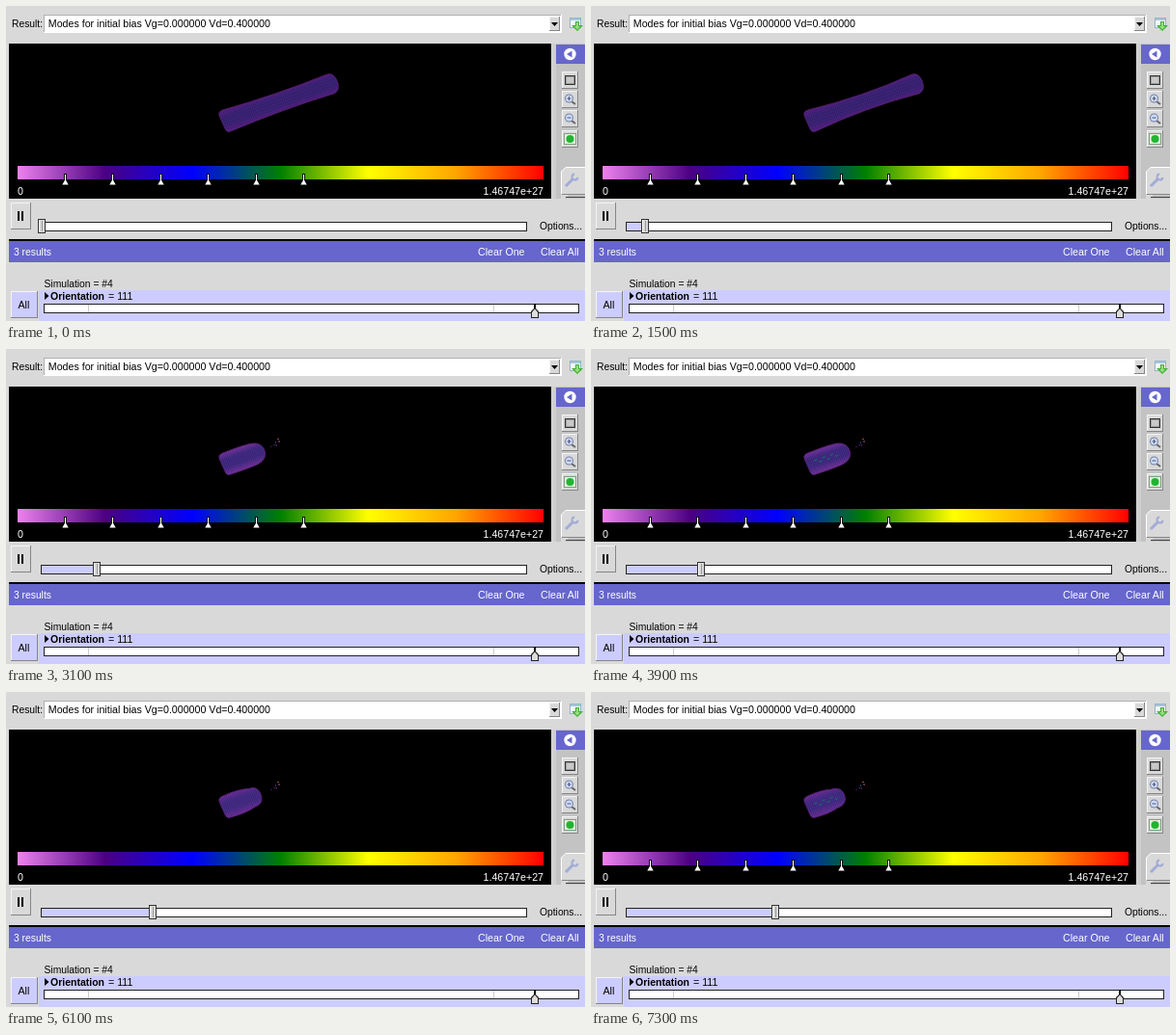
Animation of 600x327 px, one loop 8 s. Source, as an HTML page with a canvas:

```html
<!DOCTYPE html>
<html lang="en">
<head>
<meta charset="utf-8">
<title>Mode viewer</title>
<style>
  html, body { margin: 0; width: 100%; height: 100%; overflow: hidden; background: #d9d9d9; }
  canvas, svg { position: absolute; left: 0; top: 0; width: 600px; height: 327px; }
  text { font: 10.65px "Liberation Sans", Arial, sans-serif; white-space: pre; }
  .small { font-size: 10.3px; }
  .light { fill: #fff; }
  .bold { font-weight: bold; font-size: 10.5px; }
</style>
</head>
<body>
<canvas id="stage" width="600" height="327"></canvas>
<svg viewBox="0 0 600 327">
  <text class="small" x="6" y="22">Result:</text>
  <text x="43.8" y="22">Modes for initial bias Vg=0.000000 Vd=0.400000</text>
  <text class="light" x="12" y="196">0</text>
  <text class="light" x="557" y="196" text-anchor="end">1.46747e+27</text>
  <text class="small" x="553" y="232">Options...</text>
  <text class="light small" x="8" y="259">3 results</text>
  <text class="light" x="489" y="259">Clear One</text>
  <text class="light" x="554" y="259">Clear All</text>
  <text class="small" x="39.5" y="291.5">Simulation = #4</text>
  <text class="bold" x="46" y="305">Orientation</text>
  <text x="106" y="305">= 111</text>
  <text x="12.5" y="314">All</text>
</svg>
<script>
const LOOP = 8000, TICK = 100;
const FIRST_STEP = 760, STEP_TIME = 920, LAST_STEP = 8;
const GREY = '#d9d9d9', PANEL = '#c3c3c3', PURPLE = '#6666cc', LAVENDER = '#ccccff';
const c = document.getElementById('stage').getContext('2d');

function box(x, y, w, h, fill) {
  c.fillStyle = fill;
  c.fillRect(x, y, w, h);
}

function frame(x, y, w, h, fill, edge) {
  box(x, y, w, h, edge);
  box(x + 1, y + 1, w - 2, h - 2, fill);
}

function raised(x, y, w, h, fill) {
  box(x, y, w, h, '#858585');
  box(x, y, w - 1, h - 1, '#f4f4f4');
  box(x + 1, y + 1, w - 2, h - 2, fill);
}

function poly(points, fill) {
  c.beginPath();
  points.forEach(([x, y]) => c.lineTo(x, y));
  c.closePath();
  c.fillStyle = fill;
  c.fill();
}

function line(x1, y1, x2, y2, color, width = 1) {
  c.beginPath();
  c.moveTo(x1, y1);
  c.lineTo(x2, y2);
  c.strokeStyle = color;
  c.lineWidth = width;
  c.stroke();
}

function disc(x, y, r, fill) {
  c.beginPath();
  c.arc(x, y, r, 0, Math.PI * 2);
  c.fillStyle = fill;
  c.fill();
}

function drawResultBar() {
  box(39, 9, 537, 19, '#fff');
  box(39, 9, 536, 1, '#b0b0b0');
  box(39, 9, 1, 18, '#b0b0b0');
  raised(563, 11, 11, 15, GREY);
  poly([[565, 17], [572, 17], [568.5, 21]], '#000');

  frame(584, 12, 12, 11, '#f2f6f8', '#93b4c6');
  box(585, 13, 10, 2, '#a9c6da');
  poly([[590, 16], [594, 16], [594, 20], [598, 20], [592, 26], [586, 20], [590, 20]], '#43b035');
  poly([[591, 17], [593, 17], [593, 21], [595, 21], [592, 24.5], [589, 21], [591, 21]], '#96df7e');
}

function magnifier(y, plus) {
  line(586, y + 2, 590, y + 5, '#666', 2);
  disc(583.5, y - 1, 4.5, '#7380a6');
  disc(583.5, y - 1, 3.5, '#cfdaf6');
  line(581.5, y - 1, 585.5, y - 1, '#4b5680');
  if (plus) line(583.5, y - 3, 583.5, y + 1, '#4b5680');
}

function drawTools() {
  box(566, 39, 34, 161, PANEL);
  box(566, 39, 4, 161, '#cfcfcf');
  box(570, 40, 30, 20, PURPLE);
  disc(584.5, 50, 6.2, '#fff');
  poly([[581, 50], [586.5, 46.5], [586.5, 53.5]], PURPLE);

  [68, 88, 108, 129].forEach(y => raised(576, y, 17, 18, GREY));
  frame(579, 72, 11, 10, '#999', '#333');
  box(581, 74, 7, 6, '#c8c8c8');
  magnifier(97, true);
  magnifier(117, false);
  frame(578, 132, 13, 12, '#e2f0e2', '#7ea07e');
  disc(584.5, 138, 4, '#20b52f');

  poly([[575, 200], [575, 172], [580, 167], [600, 167], [600, 195], [584, 195], [579, 200]], GREY);
  line(575.5, 195, 575.5, 172, '#fff');
  line(575.5, 172, 580, 167.5, '#fff');
  line(580, 167.5, 600, 167.5, '#fff');
  line(576, 195.5, 600, 195.5, '#888');
  line(580, 198.5, 600, 198.5, '#444');
  line(580, 187, 588, 179, '#a1acd6', 3);
  c.beginPath();
  c.arc(589.5, 177.5, 3, 0.1, 4.6);
  c.strokeStyle = '#a1acd6';
  c.lineWidth = 2;
  c.stroke();
}

// Outline along the axis, with a waist and rounded or tapered ends.
function tube(x0, x1, r0, waist, r1, cap) {
  const mid = (x0 + x1) / 2, bend = 2 * waist - (r0 + r1) / 2, left = 4;
  c.beginPath();
  c.moveTo(x0 + left, -r0);
  c.quadraticCurveTo(mid, -bend, x1 - cap, -r1);
  c.bezierCurveTo(x1 - cap * 0.35, -r1, x1, -r1 * 0.65, x1, 0);
  c.bezierCurveTo(x1, r1 * 0.65, x1 - cap * 0.35, r1, x1 - cap, r1);
  c.quadraticCurveTo(mid, bend, x0 + left, r0);
  c.bezierCurveTo(x0 + 1, r0, x0, r0 * 0.8, x0, r0 * 0.5);
  c.lineTo(x0 - 1, -r0 * 0.6);
  c.quadraticCurveTo(x0 - 1, -r0, x0 + left, -r0);
  c.closePath();
}

function paintTube(x0, x1, r0, waist, r1, cap, glow, core) {
  tube(x0, x1, r0, waist, r1, cap);
  const g = c.createLinearGradient(0, -12, 0, 12);
  g.addColorStop(0, glow);
  g.addColorStop(0.3, core);
  g.addColorStop(0.65, core);
  g.addColorStop(1, glow);
  c.fillStyle = g;
  c.fill();

  c.save();
  c.clip();
  for (let x = x0; x < x1; x += 2) line(x, -13, x, 13, 'rgba(12,4,40,.2)');
  for (let y = -11; y < 12; y += 3) line(x0, y, x1, y, 'rgba(85,50,160,.22)');
  c.restore();

  tube(x0, x1, r0, waist, r1, cap);
  c.strokeStyle = '#5c2175';
  c.lineWidth = 0.8;
  c.stroke();
}

function drawSpecks() {
  box(281, 93, 2, 1, '#a84a28');
  box(282, 95, 2, 2, '#5b2850');
  box(279, 96, 1, 2, '#214262');
  box(277, 99, 3, 1, '#2c1d60');
  box(274, 101, 2, 1, '#341352');
  box(280, 99, 1, 2, '#561a3a');
}

function drawModel(n) {
  c.save();
  c.translate(224.5, 120.5);
  c.rotate(-19.5 * Math.PI / 180);
  if (n < 2) {
    paintTube(0, 126, 11.7, n ? 8.4 : 9.6, 10.5, 8, '#5e2088', '#3c2475');
  } else if (n < 5) {
    paintTube(0, 46, 11.7, 12, 11.7, 17, '#7f37a4', '#432c84');
  } else if (n === 5) {
    paintTube(0, 47, 11.7, 12.2, 10.8, 9, '#70309a', '#3f287f');
    paintTube(93, 125, 9.2, 10, 9.4, 8, '#772f92', '#5f2f8c');
  } else {
    const early = n === 6;
    paintTube(0, early ? 42 : 40.5, 11.7, 12, early ? 9.8 : 10.2, early ? 9 : 12, '#74329e', '#472d88');
  }
  if (n === 4 || n === 8) {
    for (let i = 0; i < 6; i++) box(8 + i * 4.4, -3 + (i % 2) * 3, 3, 2, '#265570');
  }
  c.restore();
  if (n > 1) drawSpecks();
}

function drawLegend(showPins) {
  const g = c.createLinearGradient(12, 0, 557, 0);
  ['#ee82ee', '#4b0082', '#0000ff', '#008000', '#ffff00', '#ffa500', '#ff0000']
    .forEach((color, i) => g.addColorStop(i / 6, color));
  box(12, 166, 545, 14, g);
  if (!showPins) return;
  for (let i = 0; i < 6; i++) {
    const x = Math.round(61 + i * 49.4);
    box(x - 1, 174, 3, 6, '#111');
    box(x, 175, 1, 6, '#fff');
    poly([[x + 0.5, 180], [x + 3.7, 185.5], [x - 2.7, 185.5]], '#fff');
  }
}

function drawPlayer(n) {
  raised(5, 204, 21, 28, GREY);
  box(12, 213, 2, 10, '#000');
  box(16, 213, 2, 10, '#000');

  const x = Math.round(36.5 + n * 19.25);
  frame(36, 224, 504, 10, '#fff', '#222');
  if (n) box(37, 225, x - 37, 8, LAVENDER);
  frame(x - 4, 221, 8, 15, GREY, '#333');
  box(x - 3, 222, 1, 13, '#fff');
  box(x, 223, 1, 11, '#999');
}

function drawResults() {
  box(3, 242, 597, 2, '#000');
  box(3, 244, 597, 22, PURPLE);
  box(34, 295, 566, 32, LAVENDER);
  raised(5, 296, 28, 28, LAVENDER);
  poly([[40, 297], [44.5, 301], [40, 305]], '#000');
  frame(39, 309, 555, 10, '#fff', '#222');
  box(85, 310, 1, 8, '#ccc');
  box(505, 310, 1, 8, '#ccc');
  box(547, 309, 2, 6, '#000');
  poly([[548, 313], [552, 317], [552, 324], [544, 324], [544, 317]], '#222');
  poly([[548, 314.5], [551, 318], [551, 323], [545, 323], [545, 318]], '#ddd');
}

function draw(now) {
  const t = Math.floor((now % LOOP) / TICK) * TICK;
  const n = Math.max(0, Math.min(LAST_STEP, Math.floor((t - FIRST_STEP) / STEP_TIME) + 1));
  box(0, 0, 600, 327, GREY);
  drawResultBar();
  drawTools();
  box(3, 39, 562, 161, '#000');
  drawModel(n);
  drawLegend(t < 5900 || t >= 6500);
  drawPlayer(n);
  drawResults();
}

const start = performance.now();
function tick() {
  draw(performance.now() - start);
  requestAnimationFrame(tick);
}
tick();
</script>
</body>
</html>
```
